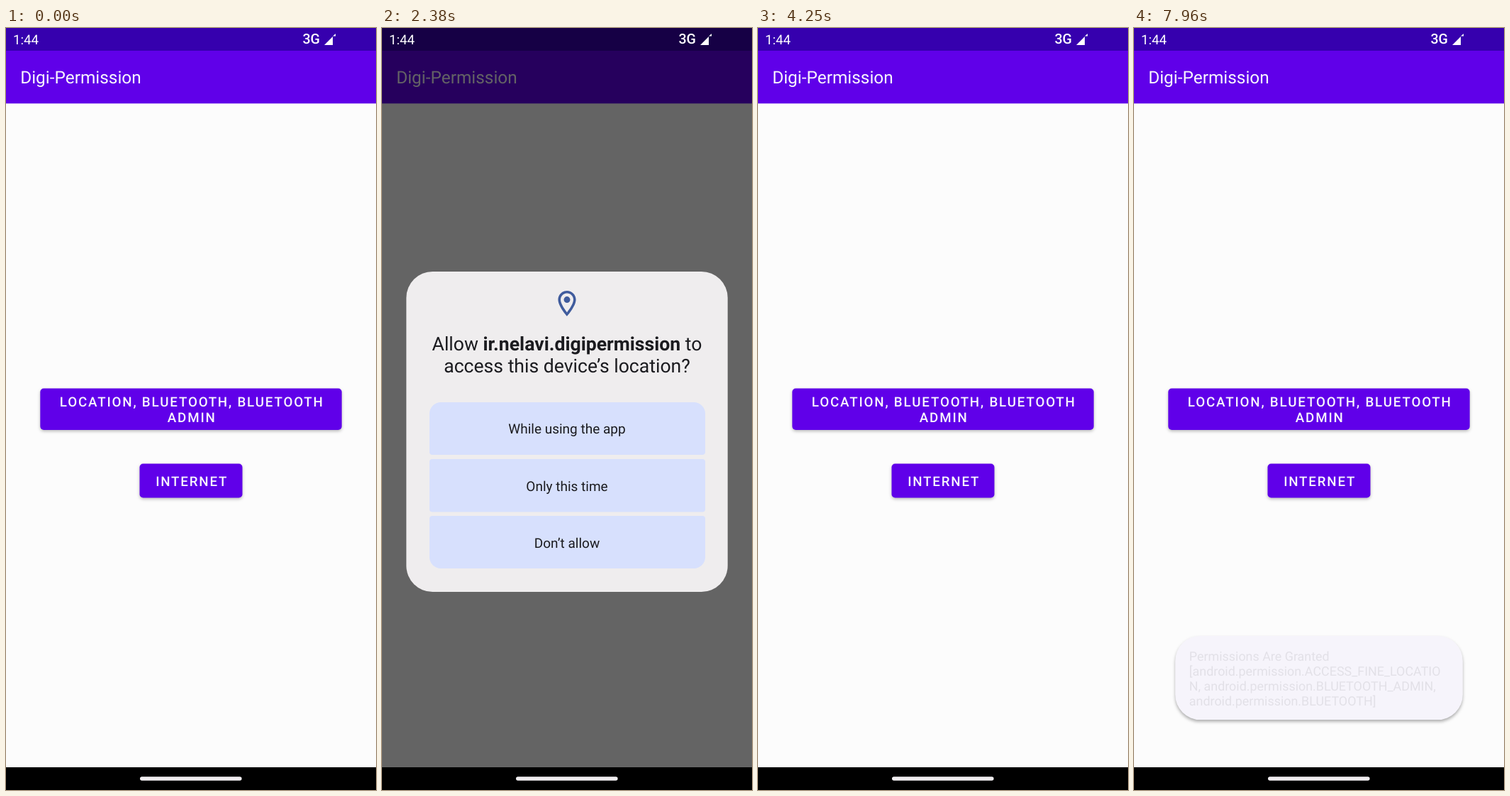
An HTML page that plays this animation: 522x1073 px, repeating every 8000 ms.

```html
<!DOCTYPE html>
<html lang="en">
<head>
<meta charset="utf-8">
<title>Digi-Permission</title>
<style>
  html, body { margin: 0; width: 100%; height: 100%; overflow: hidden; background: #fcfcfc; }
  svg { display: block; width: 100%; height: 100%; font-family: Roboto, sans-serif; text-rendering: geometricPrecision; }
  .light { fill: #f8f5fd; }
  .button rect, .bar { fill: #6000e9; }
  .button rect { filter: drop-shadow(0 2px 2px rgba(0, 0, 0, .26)); }
  .button text { fill: #f8f5fd; font-size: 18.8px; font-weight: 500; letter-spacing: 1.8px; text-anchor: middle; }
  .button .ripple { fill: #fff; filter: none; }
  #dialog { fill: #1b1b1f; text-anchor: middle; font-size: 19px; }
  #dialog .ask { font-size: 26.6px; }
  #dialog .choice { fill: #d7e0fd; }
  #toast { fill: #1b1b1f; font-size: 18.8px; }
  #toast rect { fill: #f6f4fb; filter: drop-shadow(0 3px 2.5px rgba(0, 0, 0, .3)); }
</style>
</head>
<body>
<svg viewBox="0 0 522 1073">
  <rect width="522" height="1073" fill="#fcfcfc"/>
  <rect class="bar" y="31" width="522" height="75.3"/>
  <rect width="522" height="32" fill="#3600ae"/>
  <text class="light" x="20.2" y="78.2" font-size="24.4">Digi-Permission</text>

  <g class="button">
    <rect x="48.3" y="507.5" width="425.4" height="58.5" rx="5"/>
    <rect id="ripple" class="ripple" x="48.3" y="507.5" width="425.4" height="58.5" rx="5"/>
    <text x="262.2" y="533.2">LOCATION, BLUETOOTH, BLUETOOTH</text>
    <text x="262.2" y="555.2">ADMIN</text>
  </g>
  <g class="button">
    <rect x="188.5" y="613.5" width="145" height="48" rx="5"/>
    <text x="262.2" y="644.6">INTERNET</text>
  </g>

  <rect id="dim" width="522" height="1073"/>

  <g id="dialog">
    <rect x="34.3" y="343" width="453.4" height="451" rx="37" fill="#efedee"/>
    <path transform="translate(239.4 366.4) scale(1.8)" fill="#405c9d" fill-rule="evenodd"
      d="M12 2C8.13 2 5 5.13 5 9c0 5.25 7 13 7 13s7-7.75 7-13c0-3.87-3.13-7-7-7z
         M7 9c0-2.76 2.24-5 5-5s5 2.24 5 5c0 2.88-2.88 7.19-5 9.88C9.92 16.21 7 11.85 7 9z
         M9.5 9a2.5 2.5 0 1 0 5 0a2.5 2.5 0 1 0-5 0z"/>
    <text class="ask" x="261" y="453.5">Allow <tspan font-weight="700">ir.nelavi.digipermission</tspan> to</text>
    <text class="ask" x="261" y="484.6">access this device’s location?</text>
    <path class="choice" d="M67 597V543a16 16 0 0 1 16-16H440a16 16 0 0 1 16 16V597a4 4 0 0 1-4 4H71a4 4 0 0 1-4-4z"/>
    <rect class="choice" x="67" y="607" width="389" height="74.5" rx="4"/>
    <path class="choice" d="M67 691V745a16 16 0 0 0 16 16H440a16 16 0 0 0 16-16V691a4 4 0 0 0-4-4H71a4 4 0 0 0-4 4z"/>
    <text x="261" y="571.4">While using the app</text>
    <text x="261" y="651.5">Only this time</text>
    <text x="261" y="731.6">Don’t allow</text>
  </g>

  <g id="toast">
    <rect x="48.3" y="853" width="425.4" height="124" rx="37"/>
    <g id="message">
      <text x="68.8" y="889.4">Permissions Are Granted</text>
      <text x="68.8" y="911.6">[android.permission.ACCESS_FINE_LOCATIO</text>
      <text x="68.8" y="933.8">N, android.permission.BLUETOOTH_ADMIN,</text>
      <text x="68.8" y="956">android.permission.BLUETOOTH]</text>
    </g>
  </g>

  <g fill="#fff">
    <text x="9.9" y="23" font-size="18.8">1:44</text>
    <text x="418.4" y="22.3" font-size="19.6" font-weight="500">3G</text>
    <path d="M449 24L461 12V24ZM461 11.5L465 8V11.5Z"/>
  </g>
  <rect y="1041" width="522" height="32"/>
  <rect x="189" y="1054.2" width="143.6" height="5.6" rx="2.8" fill="#f0edf0"/>
</svg>
<script>
const LOOP = 8000;
const PRESS = 2090, OPEN = 2225, CLOSE = 3906, TOAST_IN = 4290, TOAST_OUT = 7815;
const $ = id => document.getElementById(id);
const ramp = (t, start, length) => Math.min(1, Math.max(0, (t - start) / length));

// Cubic Bezier easing, solved by bisection.
function bezier(x, x1, y1, x2, y2) {
  const at = (a, b, s) => 3 * a * s * (1 - s) ** 2 + 3 * b * s * s * (1 - s) + s ** 3;
  let low = 0, high = 1;
  for (let i = 0; i < 24; i++) {
    const mid = (low + high) / 2;
    if (at(x1, x2, mid) < x) low = mid; else high = mid;
  }
  return at(y1, y2, (low + high) / 2);
}

function draw(t) {
  $('ripple').setAttribute('opacity', 0.115 * (ramp(t, PRESS, 90) - ramp(t, 2400, 150)));

  const enter = ramp(t, OPEN, 150), leave = ramp(t, CLOSE, 275);
  $('dim').setAttribute('opacity', 0.6 * (enter - leave));
  const drop = 1073 * ((1 - enter) ** 4 + leave ** 2.45);
  $('dialog').setAttribute('transform', `translate(0 ${drop})`);

  const grow = bezier(ramp(t, TOAST_IN, 333), 0, 0, 0, 1);
  const shrink = bezier(ramp(t, TOAST_OUT, 250), 0.3, 0, 1, 1);
  const scale = 0.9 + 0.1 * (grow - shrink);
  $('toast').setAttribute('transform', `translate(261 915) scale(${scale}) translate(-261 -915)`);
  $('toast').setAttribute('opacity', ramp(t, TOAST_IN, 66) - ramp(t, TOAST_OUT + 150, 100));
  $('message').setAttribute('opacity', ramp(t, TOAST_IN + 50, 283) - ramp(t, TOAST_OUT, 160));
}

const began = performance.now();
function tick() {
  draw((performance.now() - began) % LOOP);
  requestAnimationFrame(tick);
}
tick();
</script>
</body>
</html>
```
